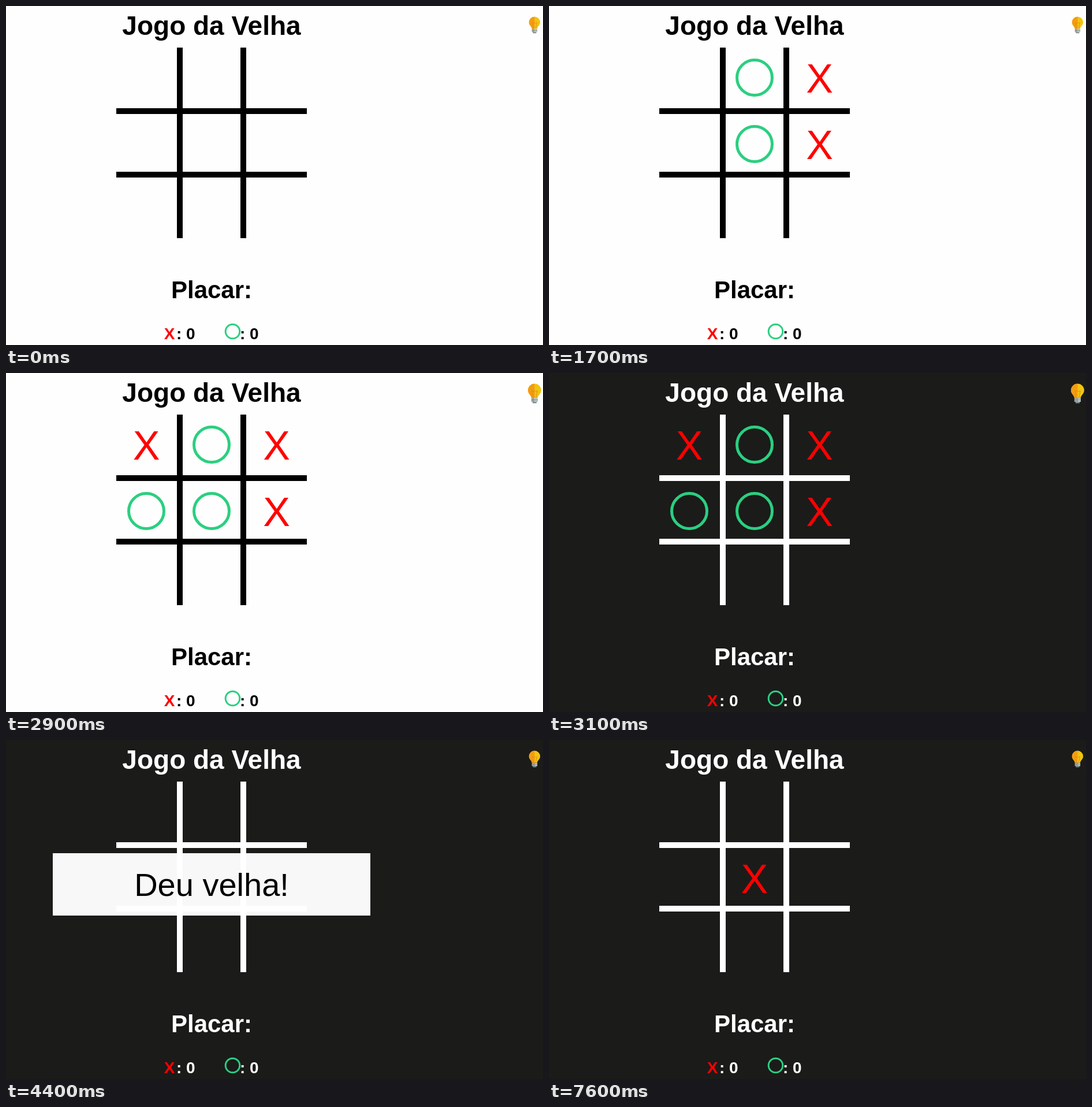
Write an HTML page with a canvas that moves like this. It is 930 by 587 pixels and loops after 8 s.

```html
<!DOCTYPE html>
<html lang="pt">
<head>
<meta charset="utf-8">
<title>Jogo da Velha</title>
<style>
html, body { margin: 0; width: 100%; height: 100%; overflow: hidden; background: #fefefe; }
canvas { display: block; }
</style>
</head>
<body>
<canvas id="stage" width="930" height="587"></canvas>
<script>
const ctx = document.getElementById('stage').getContext('2d');
const LOOP = 8000;
const FAMILY = '"Liberation Sans", Arial, sans-serif';
const RED = '#ff0000', GREEN = '#2bcf80';
const CENTER = 356;
const COLS = [243, 355.9, 468.7];
const ROWS = [124, 239, 349];

// Each move: mark, column, row, time placed, time cleared.
const MOVES = [
  ['X', 2, 0, 500, 4400],
  ['O', 1, 1, 1000, 4400],
  ['X', 2, 1, 1400, 4400],
  ['O', 1, 0, 1700, 4400],
  ['X', 0, 0, 2100, 4400],
  ['O', 0, 1, 2400, 4400],
  ['X', 1, 2, 3600, 4400],
  ['O', 2, 2, 3900, 4400],
  ['X', 1, 1, 7600, LOOP]
];

const between = (t, from, to) => t >= from && t < to;

function text(str, x, y, size, color, weight = 'bold', align = 'center') {
  ctx.font = `${weight} ${size}px ${FAMILY}`;
  ctx.textAlign = align;
  ctx.fillStyle = color;
  ctx.fillText(str, x, y);
}

function ring(x, y, outer, width) {
  ctx.strokeStyle = GREEN;
  ctx.lineWidth = width;
  ctx.beginPath();
  ctx.arc(x, y, outer - width / 2, 0, Math.PI * 2);
  ctx.stroke();
}

function grid(color) {
  ctx.fillStyle = color;
  for (const offset of [105, 215]) {
    ctx.fillRect(191 + offset, 72, 10, 330);
    ctx.fillRect(191, 72 + offset, 330, 10);
  }
}

function mark(kind, col, row) {
  if (kind === 'X') text('X', COLS[col], ROWS[row] + 26, 70, RED, 'normal');
  else ring(Math.round(COLS[col]), ROWS[row], 33, 5);
}

function glass() {
  ctx.beginPath();
  ctx.moveTo(-4.6, 21);
  ctx.bezierCurveTo(-4.6, 17, -9.7, 15, -9.7, 9.7);
  ctx.arc(0, 9.7, 9.7, Math.PI, 0);
  ctx.bezierCurveTo(9.7, 15, 4.6, 17, 4.6, 21);
  ctx.closePath();
}

function bulb(scale) {
  ctx.save();
  ctx.translate(915.4, 18.6);
  ctx.scale(scale, scale);

  glass();
  ctx.fillStyle = '#f1c40f';
  ctx.fill();
  ctx.save();
  ctx.clip();
  ctx.fillStyle = '#f39c12';
  ctx.fillRect(-10, 0, 10, 22);
  ctx.restore();

  ctx.strokeStyle = '#e08a18';
  ctx.lineWidth = 0.8;
  ctx.beginPath();
  ctx.moveTo(-2, 21);
  ctx.lineTo(-4, 10);
  ctx.lineTo(-1.5, 11.5);
  ctx.lineTo(0, 10);
  ctx.lineTo(1.5, 11.5);
  ctx.lineTo(4, 10);
  ctx.lineTo(2, 21);
  ctx.stroke();

  ctx.fillStyle = '#95a5a6';
  ctx.fillRect(-4.7, 21, 4.7, 5.6);
  ctx.fillStyle = '#bdc3c7';
  ctx.fillRect(0, 21, 4.7, 5.6);
  ctx.fillStyle = '#7f8c8d';
  ctx.fillRect(-4.7, 23.3, 9.4, 0.8);
  ctx.fillRect(-3, 26.6, 6, 2);
  ctx.restore();
}

function scores(ink) {
  text('Placar:', CENTER, 506, 42, ink);
  text('X', 283.2, 577, 28, RED);
  text(': 0', 295, 577, 28, ink, 'bold', 'left');
  ring(392.5, 563.5, 13.8, 3);
  text(': 0', 405, 577, 28, ink, 'bold', 'left');
}

function banner() {
  ctx.fillStyle = 'rgba(255, 255, 255, 0.97)';
  ctx.fillRect(81, 196, 550, 108);
  text('Deu velha!', CENTER, 270, 56, '#000', 'normal');
}

function draw(t) {
  const dark = t >= 3100;
  const ink = dark ? '#fff' : '#000';
  ctx.fillStyle = dark ? '#1b1b1a' : '#fefefe';
  ctx.fillRect(0, 0, 930, 587);

  text('Jogo da Velha', CENTER, 50, 46, ink);
  bulb(between(t, 2900, 3200) ? 1.18 : 1);
  grid(ink);
  for (const [kind, col, row, from, to] of MOVES) {
    if (between(t, from, to)) mark(kind, col, row);
  }
  scores(ink);
  if (between(t, 4400, 7100)) banner();
}

const start = performance.now();
function tick() {
  draw((performance.now() - start) % LOOP);
  requestAnimationFrame(tick);
}
tick();
</script>
</body>
</html>
```
